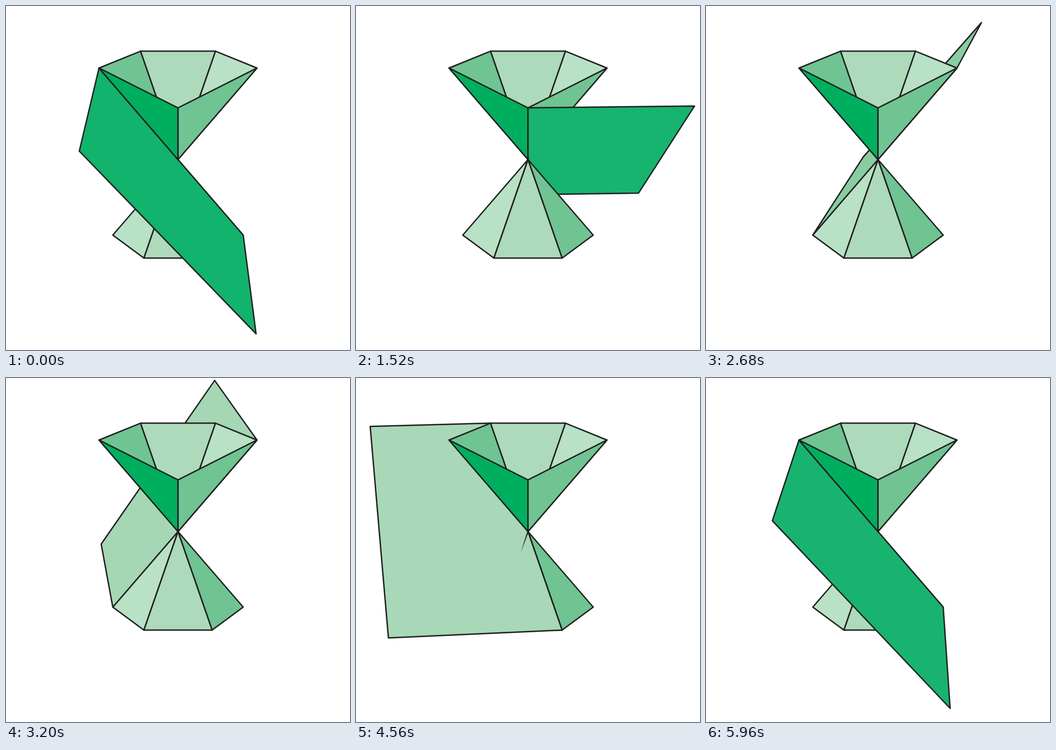
An HTML page with a canvas that plays this animation: 625x625 px, repeating every 6000 ms.

```html
<!DOCTYPE html>
<html lang="en">
<head>
<meta charset="utf-8">
<title>Plane rolling around a double cone</title>
<style>
html, body { margin: 0; width: 100%; height: 100%; overflow: hidden; background: #fff; }
canvas { display: block; }
</style>
</head>
<body>
<canvas id="stage" width="625" height="625"></canvas>
<script>
const ctx = document.getElementById('stage').getContext('2d');
const LOOP = 6000, STEP = 40;
const SCALE = 129.8, DIST = 6 * Math.SQRT2, PITCH = 35 * Math.PI / 180;
const SIN = Math.sin(PITCH), COS = Math.cos(PITCH);
const H = Math.SQRT2, RADIUS = 1.5 * Math.SQRT2;
const INK = '#1f1f1f', LINE = 2.5;

// Rim corners [x, z] in rolling order; face i joins corner i to corner i + 1.
const RIM = [[-1, 0], [0, 1], [1, 0], [.5, -.5], [-.5, -.5]];
const FACES = [[0, 175, 94], [112, 196, 146], [185, 225, 197], [173, 218, 186], [112, 196, 146]];
// Angles at which the plane lies flat on each face.
const FLAT = [45, 135, 225, 270, 315];
// Plane shade by angle: [degrees, r, g, b].
const SHADES = [
  [0, 18, 179, 108], [33, ...FACES[0]], [57, ...FACES[0]], [90, 20, 180, 110],
  [135, ...FACES[1]], [192, 165, 215, 180], [225, ...FACES[2]], [270, ...FACES[3]],
  [315, ...FACES[4]], [357.6, 24, 180, 111], [360, 18, 179, 108]
];

const rgb = c => `rgb(${c.map(Math.round).join()})`;
const corner = (i, side) => {
  const [x, z] = RIM[(i + 5) % 5];
  return [side * x, side * H, side * z];
};

function project([x, y, z]) {
  const k = SCALE / (1 - (y * SIN + z * COS) / DIST);
  return [312.5 + x * k, 279 - (y * COS - z * SIN) * k];
}

function polygon(points, fill) {
  ctx.beginPath();
  points.forEach(p => ctx.lineTo(...project(p)));
  ctx.closePath();
  ctx.fillStyle = fill;
  ctx.fill();
  ctx.stroke();
}

function cone(side) {
  const order = side > 0 ? [3, 4, 2, 0, 1] : [4, 2, 3];
  for (const i of order)
    polygon([[0, 0, 0], corner(i, side), corner(i + 1, side)], rgb(FACES[i]));
}

function shade(deg) {
  const i = SHADES.findIndex(s => s[0] > deg);
  const [a, ...from] = SHADES[i - 1], [b, ...to] = SHADES[i];
  return rgb(from.map((v, n) => v + (to[n] - v) * (deg - a) / (b - a)));
}

// An edge almost touching the plane shows through as a tapering sliver.
function sliver(i, side, gap) {
  const [x0, y0] = project([0, 0, 0]), [x1, y1] = project(corner(i, side));
  const full = Math.hypot(x1 - x0, y1 - y0);
  const reach = 145 / Math.max(gap, .1), len = Math.min(full, reach);
  const ux = (x1 - x0) / full, uy = (y1 - y0) / full;
  const a = LINE / 2, b = a * (1 - len / reach);
  const at = (d, w) => ctx.lineTo(x0 + ux * d - uy * w, y0 + uy * d + ux * w);
  ctx.beginPath();
  at(0, a); at(len, b); at(len, -b); at(0, -a);
  ctx.fillStyle = INK;
  ctx.fill();
}

function draw(deg) {
  const turn = deg * Math.PI / 180, dx = Math.sin(turn), dz = Math.cos(turn);
  const hinge = FLAT.findIndex(f => deg < f) < 0 ? 0 : FLAT.findIndex(f => deg < f);

  // Follow the plane's edge from the hinge out to the bounding circle.
  const far = ([x, y, z]) => {
    const along = x * dx + z * dz;
    const len = Math.sqrt(RADIUS ** 2 - x * x - z * z + along * along) - along;
    return [x + len * dx, y, z + len * dz];
  };
  const top = corner(hinge, 1), bottom = corner(hinge, -1);

  // Plane normal: (H * n, -reach), n horizontal and pointing away from the axis.
  const reach = top[0] * -dz + top[2] * dx;
  const near = H * dx * COS - reach * SIN > 0 ? -1 : 1;

  ctx.clearRect(0, 0, 625, 625);
  ctx.lineWidth = LINE;
  ctx.lineJoin = 'round';
  ctx.strokeStyle = INK;
  cone(-near);
  polygon([top, far(top), far(bottom), bottom], shade(deg));
  sliver(hinge + 1, -near, (FLAT[hinge] - deg + 360) % 360);
  sliver(hinge - 1, -near, (deg - FLAT[(hinge + 4) % 5] + 360) % 360);
  cone(near);
}

function frame(now) {
  const t = Math.floor(now % LOOP / STEP) * STEP;
  draw(t / LOOP * 360);
  requestAnimationFrame(frame);
}
draw(0);
requestAnimationFrame(frame);
</script>
</body>
</html>
```
